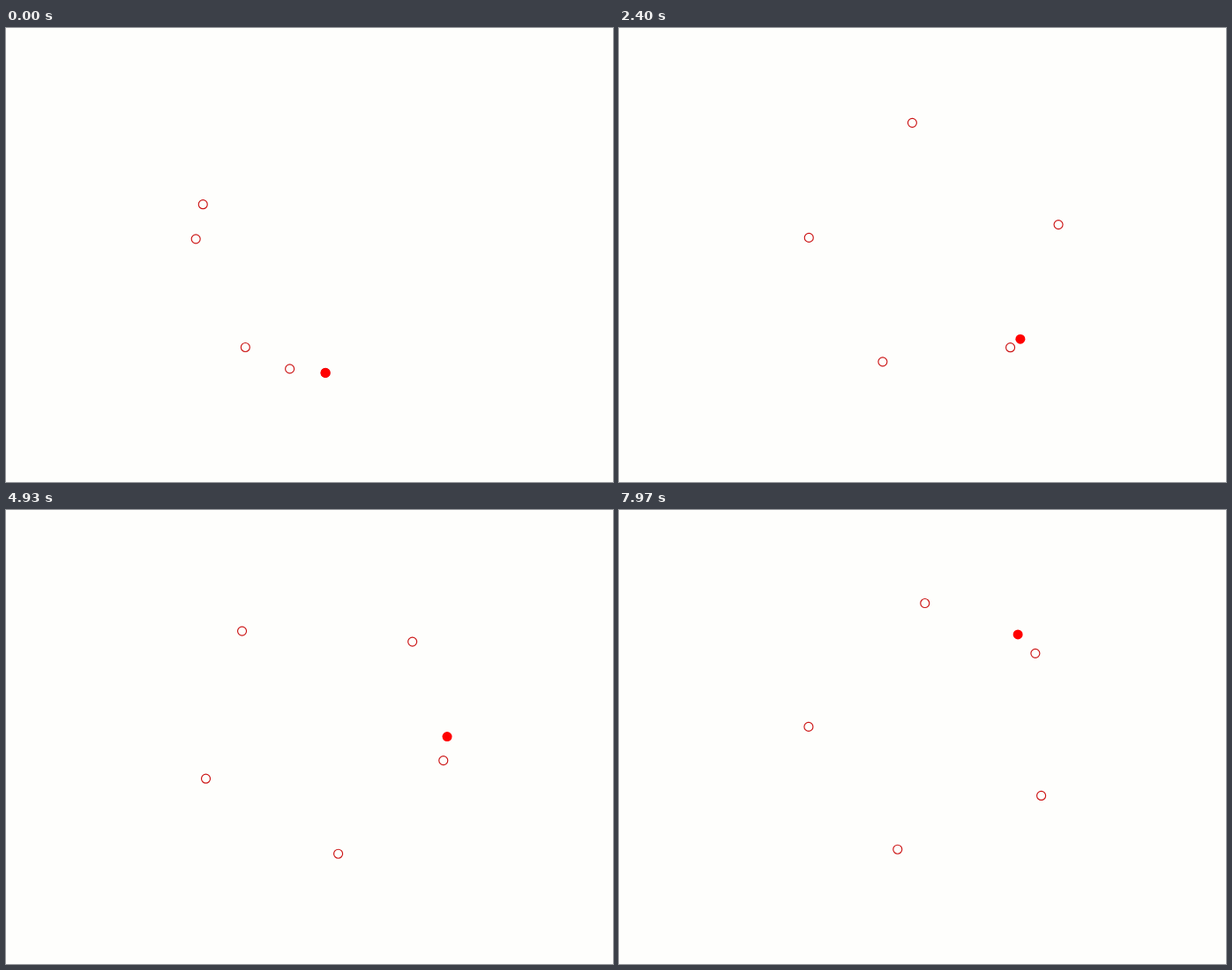
Recreate the animation shown at these times as an HTML page. Size 688x514 px, loop 8 s.

```html
<!DOCTYPE html>
<html lang="en">
<head>
<meta charset="utf-8">
<title>Followers on a circle</title>
<style>
  html, body { margin: 0; width: 100%; height: 100%; overflow: hidden; background: #fefefc; }
  svg { display: block; width: 688px; height: 514px; }
  .follower { fill: none; stroke: #cc1414; stroke-width: 1.15; }
  .leader { fill: #f00; }
</style>
</head>
<body>
<svg id="stage" viewBox="0 0 688 514"></svg>
<script>
const LOOP = 8000, FPS = 30;
const CENTER = { x: 357.6, y: 247.8 }, RADIUS = 142.7;
const LEADER_START = -88.2, LEADER_SPEED = 17.16;   // degrees, degrees per second
const SLOW_RATE = 0.775, FAST_RATE = 4;             // decay per second

// Angles in degrees ahead of the leader: where each follower starts,
// where it settles, and how much of its error decays slowly.
const followers = [
  { start: 343.6, rest: 348.2, slow: 37.7 },
  { start: 360.0, rest: 405.7, slow: 73.8 },
  { start: 248.5, rest: 130.3, slow: 108.5 },
  { start: 264.6, rest: 204.2, slow: 119.8 },
  { start: 321.0, rest: 279.3, slow: 86.2 }
];

const stage = document.getElementById('stage');

function addDot(className, radius) {
  const dot = document.createElementNS('http://www.w3.org/2000/svg', 'circle');
  dot.setAttribute('class', className);
  dot.setAttribute('r', radius);
  return stage.appendChild(dot);
}

function place(dot, degrees) {
  const angle = degrees * Math.PI / 180;
  dot.setAttribute('cx', CENTER.x + RADIUS * Math.cos(angle));
  dot.setAttribute('cy', CENTER.y - RADIUS * Math.sin(angle));
}

function offset({ start, rest, slow }, t) {
  const fast = start - rest - slow;
  return rest + slow * Math.exp(-SLOW_RATE * t) + fast * Math.exp(-FAST_RATE * t);
}

const rings = followers.map(() => addDot('follower', 5));
const leader = addDot('leader', 5.5);

function draw(ms) {
  // Steps start on times rounded to 10 ms, hence the small lead.
  const t = Math.floor((ms + 5) * FPS / 1000) / FPS;
  const lead = LEADER_START + LEADER_SPEED * t;
  place(leader, lead);
  followers.forEach((f, i) => place(rings[i], lead + offset(f, t)));
}

const begin = performance.now();
function tick() {
  draw((performance.now() - begin) % LOOP);
  requestAnimationFrame(tick);
}
tick();
</script>
</body>
</html>
```
